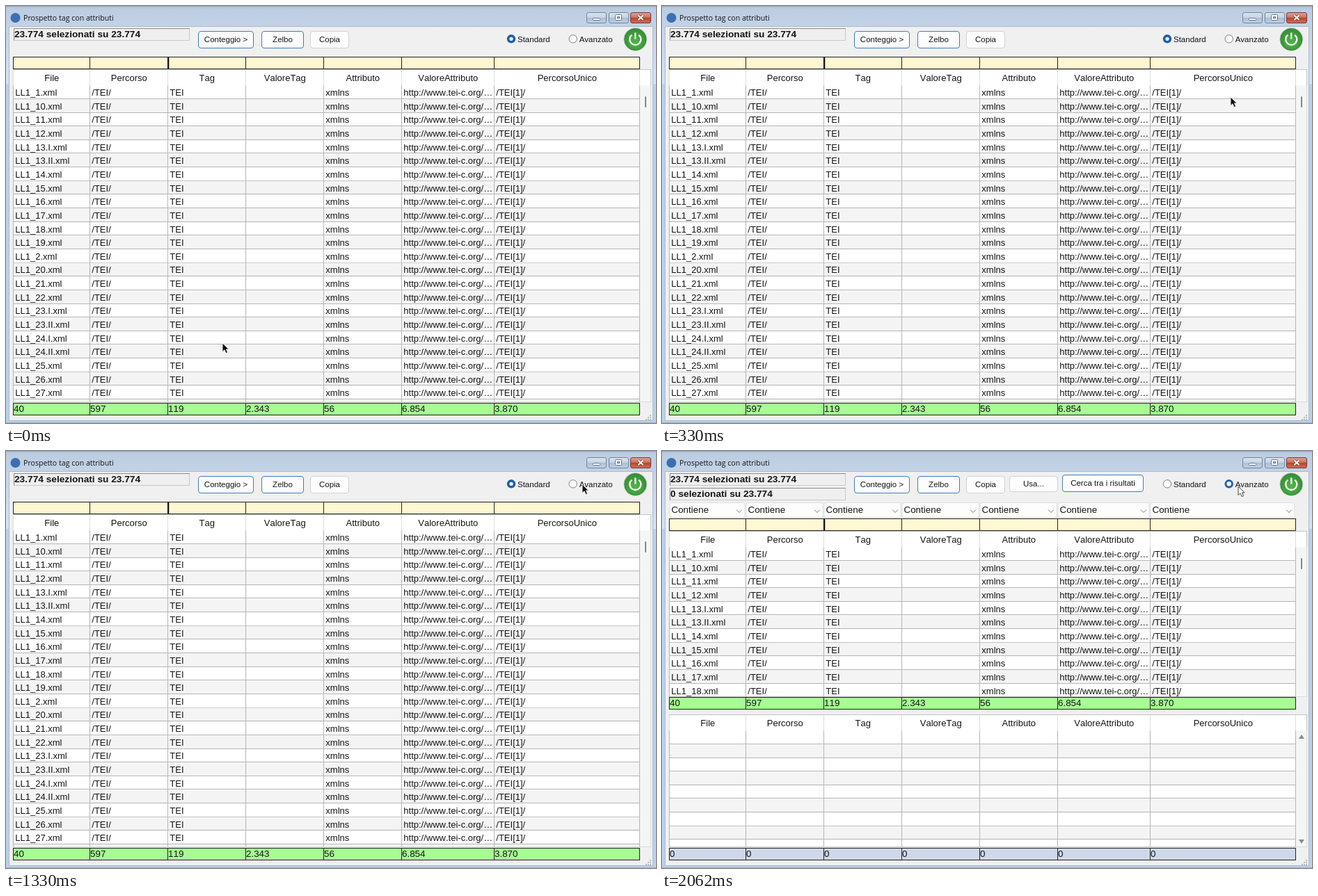
Write an HTML page that moves like this. It is 934 px wide and 600 px high and loops after 2.33 s.

```html
<!DOCTYPE html>
<html lang="it">
<head>
<meta charset="utf-8">
<title>Prospetto tag con attributi</title>
<style>
html, body { margin: 0; width: 100%; height: 100%; overflow: hidden; background: #f0f0f0; }
svg { display: block; width: 934px; height: 600px; }
text { font: 13px "Liberation Sans", Arial, sans-serif; font-kerning: none; fill: #141414; white-space: pre; }
.title { font: 10.6px "Open Sans", sans-serif; }
.label { font-size: 11.5px; }
.count { font-size: 13.7px; font-weight: bold; }
.total, .combo { font-size: 13.4px; }
.mid { text-anchor: middle; }
#standard, #advanced, #pointer, #ghost { animation: 2330ms step-end infinite; }
#standard { animation-name: standard; }
#advanced { animation-name: advanced; }
#pointer { animation-name: standard, move; }
#ghost { animation-name: advanced; }
@keyframes standard { 0% { visibility: visible } 71.2446%, 100% { visibility: hidden } }
@keyframes advanced { 0% { visibility: hidden } 71.2446%, 100% { visibility: visible } }
@keyframes move {
  0% { transform: translate(311px, 485px) }
  14.1631% { transform: translate(817px, 131px) }
  28.3262% { transform: translate(828px, 66px) }
  57.0815%, 100% { transform: translate(828px, 48px) }
}
</style>
</head>
<body>
<svg viewBox="0 0 934 600">
  <defs>
    <linearGradient id="bar" x2="0" y2="1">
      <stop stop-color="#aebfd6"/><stop offset=".15" stop-color="#bccde2"/><stop offset="1" stop-color="#c3d3e7"/>
    </linearGradient>
    <linearGradient id="side" x2="0" y2="1">
      <stop stop-color="#c3d3e7"/><stop offset="1" stop-color="#d6e3f2"/>
    </linearGradient>
    <linearGradient id="silver" x2="0" y2="1">
      <stop stop-color="#dbe5f1"/><stop offset=".48" stop-color="#c5d3e4"/><stop offset=".5" stop-color="#aabdd4"/><stop offset="1" stop-color="#c0d1e6"/>
    </linearGradient>
    <linearGradient id="red" x2="0" y2="1">
      <stop stop-color="#e3a397"/><stop offset=".48" stop-color="#cd6c58"/><stop offset=".5" stop-color="#b8422a"/><stop offset="1" stop-color="#cf7257"/>
    </linearGradient>
    <radialGradient id="green" cy=".6">
      <stop stop-color="#4fb548"/><stop offset=".6" stop-color="#41a63f"/><stop offset="1" stop-color="#399239"/>
    </radialGradient>
    <path id="arrow" d="M0 0V12.4L3 9.8L5.2 14.6L7.6 13.5L5.4 8.9H9.2Z"/>
  </defs>
  <g id="chrome"></g>
  <g id="standard"></g>
  <g id="advanced"></g>
  <use id="pointer" href="#arrow" fill="#111" stroke="#fff" stroke-width=".8"/>
  <g id="ghost"><use href="#arrow" x="828" y="51" fill="#fff" stroke="#444" stroke-width="1"/></g>
</svg>
<script>
const edges = [10.5, 120.5, 232.5, 344.5, 456.5, 568.5, 701.5, 910.5];
const heads = ['File', 'Percorso', 'Tag', 'ValoreTag', 'Attributo', 'ValoreAttributo', 'PercorsoUnico'];
const totals = ['40', '597', '119', '2.343', '56', '6.854', '3.870'];
const files = ('1 10 11 12 13.I 13.II 14 15 16 17 18 19 2 20 21 22 23.I 23.II ' +
  '24.I 24.II 25 26 27').split(' ').map(n => `LL1_${n}.xml`);
const cells = ['/TEI/', 'TEI', '', 'xmlns', 'http://www.tei-c.org/…', '/TEI[1]/'];
const pitch = 19.64, gray = '#b5b5b5';

const rect = (x, y, w, h, fill, stroke = 'none', r = 0) =>
  `<rect x="${x}" y="${y}" width="${w}" height="${h}" fill="${fill}" stroke="${stroke}" rx="${r}"/>`;
const path = (d, stroke, width = 1, fill = 'none') =>
  `<path d="${d}" stroke="${stroke}" stroke-width="${width}" fill="${fill}"/>`;
const circle = (x, y, r, fill, stroke = 'none', width = 1) =>
  `<circle cx="${x}" cy="${y}" r="${r}" fill="${fill}" stroke="${stroke}" stroke-width="${width}"/>`;
const text = (x, y, s, cls = '') => `<text x="${x}" y="${y}" class="${cls}">${s}</text>`;
const perColumn = draw => heads.map((_, i) => draw(edges[i], edges[i + 1], i)).join('');

const button = (x, y, w, h, s, color = '#d2d2d2') =>
  rect(x, y, w, h, '#fdfdfd', color, 3.5) + text(x + w / 2, y + h / 2 + 3.2, s, 'label mid');

const counter = (y, s) => rect(11.5, y, 252, 17, '#efefef', '#c9c9c9') +
  path(`M11.5 ${y + 17}V${y}H264`, '#8d8d8d') + text(12, y + 12.7, s, 'count');

const radio = (x, s, on, hole = 2.6) =>
  (on ? circle(x, 47.3, 6.2, '#1f5fae') + circle(x, 47.3, hole, '#fff')
      : circle(x, 47.3, 5.7, '#fafafa', '#808080')) + text(x + 9, 51.5, s, 'label');

const strip = (y, fill, values = []) => perColumn((l, r, i) =>
  rect(l, y, r - l, 17, fill, '#222') + text(l + .5, y + 12.8, values[i] || '', 'total'));

const filters = y => strip(y, '#fff8d2') + path(`M233.3 ${y}v17`, '#111', 2);

const combos = () => perColumn((l, r, i) => {
  const x = r - 9.5;
  return rect(l + .5, 74.5, r - l - 2, 21, '#fdfdfd', '#dedede', 2) +
    text(l + 3, 89, 'Contiene', 'combo') + path(`M${x - 4} 84.5l4 4l4-4`, '#777');
});

function table(top, bottom, names) {
  const first = top + 23;
  let out = rect(10.5, top, 916, bottom - top, '#fff', '#c4c4c4') +
    rect(911, first, 15.5, bottom - first, '#f5f5f5');
  for (let y = first - .2, i = 0; y < bottom; y += pitch, i++) {
    const end = Math.min(y + pitch, bottom);
    if (i % 2) out += rect(11, y, 899.5, end - y, '#f4f4f4');
    if (end < bottom) out += rect(11, Math.round(end) - 1, 899.5, 1, gray);
    if (names[i]) {
      out += [names[i], ...cells].map((s, c) => text(edges[c] + 2.8, y + 14.8, s)).join('');
    }
  }
  out += edges.map(x => path(`M${x} ${top}V${first}`, '#dedede') +
    path(`M${x} ${first}V${bottom}`, gray)).join('');
  return out + perColumn((l, r, i) => text((l + r) / 2 + .3, top + 16.2, heads[i], 'mid'));
}

const thumb = y => rect(918, y, 2, 16, '#858585', 'none', 1);

const power = circle(904.3, 48, 16.8, '#b9c5b7') + circle(904.3, 48, 15.5, 'url(#green)', '#32853a') +
  path('M899.4 41.7A8 8 0 1 0 909.2 41.7M904.3 38.5V47.5', '#fff', 2.3);

let grip = '';
for (let i = 0; i < 3; i++)
  for (let j = 0; j <= i; j++) grip += rect(925 - j * 3, 588 + i * 3, 2, 2, '#bcbcbc');

chrome.innerHTML =
  rect(0, 0, 934, 600, '#bcd0e8') + rect(0, 30, 934, 82, 'url(#side)') + rect(0, 0, 934, 30, 'url(#bar)') +
  rect(4.5, 29.5, 925, 567, '#f0f0f0', '#a9bbd0') +
  path('M0 .5H934', '#91a5bf') + path('M0 599.5H934', '#9fb3cc') +
  circle(13.5, 17, 7, '#3b6fb5') + text(25, 21, 'Prospetto tag con attributi', 'title') +
  rect(834.5, 9.5, 28, 15, 'url(#silver)', '#74869d', 2.5) +
  rect(866.5, 9.5, 28, 15, 'url(#silver)', '#74869d', 2.5) +
  rect(897.5, 9.5, 29, 15, 'url(#red)', '#713d39', 2.5) +
  rect(843.5, 17.5, 10, 3, '#fff', '#66758a', 1) +
  rect(875.5, 12.5, 9, 8, '#fff', '#66758a', 1) + rect(878.5, 15.5, 3, 2, '#aebfd4', '#66758a') +
  path('M908.5 13.5l7 6.5m0-6.5l-7 6.5', '#70423e', 3.6) + path('M908.5 13.5l7 6.5m0-6.5l-7 6.5', '#fff', 2) +
  counter(32.5, '23.774 selezionati su 23.774') +
  button(276.5, 36.5, 79, 24, 'Conteggio &gt;', '#3f7dc4') +
  button(367.5, 36.5, 60, 24, 'Zelbo', '#3f7dc4') +
  button(437.5, 36.5, 55, 24, 'Copia') + power + grip;

standard.innerHTML = radio(726, 'Standard', true) + radio(814.7, 'Avanzato', false) +
  filters(73.5) + table(91.5, 569.5, files) + thumb(130) + strip(571.5, '#a7fd94', totals);

advanced.innerHTML = radio(726, 'Standard', false) + radio(814.7, 'Avanzato', true, 3.3) +
  counter(53.5, '0 selezionati su 23.774') +
  button(499.5, 36.5, 69, 22, 'Usa...') +
  button(575.5, 34.5, 116, 24, 'Cerca tra i risultati', '#3f7dc4') +
  combos() + filters(97.5) +
  table(115.5, 353.5, files.slice(0, 11)) + thumb(154) + strip(354.5, '#a7fd94', totals) +
  table(379.5, 569.5, []) +
  path('M915 414l4-6l4 6ZM915 559l4 6l4-6Z', 'none', 0, '#8b8b8b') +
  strip(571.5, '#ced8e8', heads.map(() => '0'));
</script>
</body>
</html>
```
